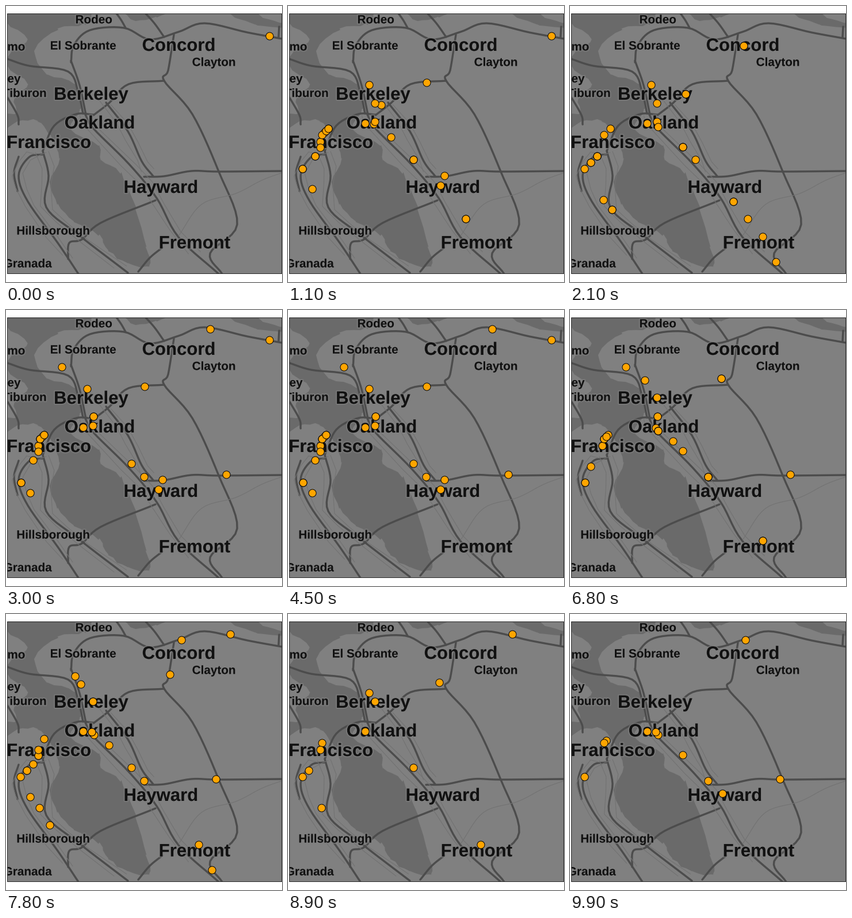
A matplotlib script for the animation above (10 s loop, 480 px wide and 480 px high).

```python
import numpy as np
import matplotlib.pyplot as plt
from matplotlib.animation import FuncAnimation
from matplotlib.patheffects import withStroke

FRAMES, STEP_MS = 100, 100
LAND, WATER, ROAD, LANE = "#808080", "#6a6a6a", "#4c4c4c", "#727272"
LEFT, RIGHT, TOP, BOTTOM = 2, 479, 13, 465
BIG, SMALL = 31.1, 20.7
rng = np.random.default_rng(5)

plt.rcParams["font.family"] = "Liberation Sans"
fig = plt.figure(figsize=(4.8, 4.8), dpi=100, facecolor="white")
ax = fig.add_axes([LEFT / 480, 1 - BOTTOM / 480,
                   (RIGHT - LEFT) / 480, (BOTTOM - TOP) / 480], facecolor=LAND)
ax.set(xlim=(LEFT, RIGHT), ylim=(BOTTOM, TOP), xticks=[], yticks=[])
for spine in ax.spines.values():
    spine.set(linewidth=0.7, color="#222222", zorder=5)


def points(path):
    return np.array([p.split(",") for p in path.split()], float)


def smooth(path, n=8):
    """Catmull-Rom curve through the key points."""
    p = points(path)
    p = np.vstack([2 * p[0] - p[1], p, 2 * p[-1] - p[-2]])
    t = np.linspace(0, 1, n)[:, None]
    return np.vstack([
        b + t * (c - a) / 2 + t**2 * (a - 2.5 * b + 2 * c - d / 2)
        + t**3 * (1.5 * (b - c) + (d - a) / 2)
        for a, b, c, d in zip(p, p[1:], p[2:], p[3:])])


def water(path):
    shore = smooth(path, 5)
    ax.fill(*(shore + rng.normal(0, 0.8, shore.shape)).T, color=WATER, lw=0, zorder=1)


def road(xy, width=3.4, color=ROAD):
    ax.plot(*xy.T, color=color, lw=width * 0.72, zorder=2,
            solid_joinstyle="round", solid_capstyle="round")


def label(text, x, y, size, align="center"):
    ax.text(x, y, text, size=size * 0.72, weight="bold", color="#111111",
            ha=align, va="baseline", zorder=3, clip_on=True,
            path_effects=[withStroke(linewidth=3, foreground="#80808099")])


# Bays
water("-5,5 0,28 38,58 12,77 2,104 38,136 14,160 18,187 -5,190 -5,218 20,201 "
      "55,200 76,225 93,265 76,305 90,345 118,375 162,398 178,425 212,447 "
      "250,452 243,418 224,350 200,291 165,268 162,243 112,214 130,178 "
      "120,135 72,119 50,77 90,40 137,32 152,5")
water("195,5 225,25 262,20 300,5")
water("365,5 400,20 436,33 485,38 485,30 446,20 436,5")

highways = {
    "delta": "113,98 118,68 146,42 205,38 250,58 300,45 345,30 420,46 480,57",
    "bridge": "240,10 258,30 275,54",
    "carquinez": "190,10 200,24 208,38",
    "shore": "113,95 128,138 139,189",
    "richmond": "2,92 40,104 108,114 126,152 134,187",
    "valley": "292,50 282,112 275,130 324,188 370,288 402,380 355,430 376,466",
    "hills": "275,130 213,136 180,168 152,190",
    "foothill": "174,168 212,218 236,270 256,296",
    "pass": "240,297 275,296 322,287 370,288 480,287",
    "nimitz": "138,189 152,213 214,275 262,334 300,402 370,466",
    "span": "260,338 165,377 132,406 110,412 108,440",
    "crossing": "64,252 84,208 122,188 152,189",
    "bayside": "64,252 74,295 70,350 126,398 212,464",
    "ridge": "64,258 40,263 22,295 38,340 90,412 126,466",
    "coast": "22,262 14,290 20,322",
    "marin": "2,158 20,190 22,206",
    "south": "230,462 250,438 272,420",
    "east": "475,36 474,54",
}
for path in highways.values():
    road(smooth(path))

# Side streets run roughly alongside the main routes
for name in ("nimitz", "foothill", "bayside", "ridge"):
    for shift in (-11, 9):
        line = smooth(highways[name])[::5] + (shift, 0)
        road(line + rng.normal(0, 2, line.shape), 1.1, LANE)
road(smooth("300,400 340,345 400,326 445,303 480,290"), 1.1, LANE)

for text, x, y in (("Concord", 300.5, 78), ("Berkeley", 148, 163),
                   ("Oakland", 163, 213), ("Hayward", 269.5, 325),
                   ("Fremont", 328, 421.5)):
    label(text, x, y, BIG)
for text, x, y in (("Rodeo", 152.5, 30.2), ("El Sobrante", 134, 75.6),
                   ("Clayton", 361.5, 104.3), ("Hillsborough", 82, 397.5)):
    label(text, x, y, SMALL)
label("San Francisco", 148.5, 247, BIG, "right")
for text, x, y in (("San Anselmo", 33, 77.4), ("Mill Valley", 26, 133),
                   ("Tiburon", 70.5, 158.2), ("El Granada", 79.5, 454.5)):
    label(text, x, y, SMALL, "right")


def backward(path):
    return " ".join(reversed(path.split()))


def stations(path):
    """Stops of a line; each * is spaced evenly between its neighbours."""
    stops = path.split()
    known = [i for i, s in enumerate(stops) if s != "*"]
    xy = points(" ".join(stops[i] for i in known))
    return np.column_stack([np.interp(range(len(stops)), known, c) for c in xy.T])


# Track sections, joined into lines
delta = "458,51.5 389.5,34.5 355,33 304.5,45 301.5,69 284.5,105 * 241,133 * 161.5,172 "
north = "97,98.5 120,107.5 * * 151,152 * "
centre = "151.5,185 150.5,201 148.5,205 "
tube = "134,204 69.5,213 * * 59,224 55.5,236 56,245.5 46.5,261 * 24.5,282.5 "
peninsula = "26,299.5 * 57.5,337 73,354 "
lake = "152.5,210 178.5,227.5 196,244.5 * 240,290 "
south = "265,311.5 284,339.5 * 334.5,400.5 358,444.5"
LINES = [stations(path) for path in (
    delta + centre + tube + peninsula,
    north + centre + lake + south,
    backward(lake + "272,295 365,287 383,286") + " " + tube,
    backward(lake + south) + " " + tube,
    north + centre + tube + peninsula + "76,367",
    "196,244.5 186,277",
)]
MINUTES, DWELL, EVENING = 11, 2, 85


def run_times(stops):
    gaps = np.hypot(*np.diff(stops, axis=0).T)
    return np.concatenate([[0], np.cumsum(1 + gaps / 12)])


def trains(step):
    """Stations where a train is standing, both directions of every line."""
    clock = step * MINUTES
    late = step >= EVENING
    headway = 20 if late else 15
    found = []
    for i, line in enumerate(LINES[:3] if late else LINES):
        for j, stops in enumerate((line, line[::-1])):
            since = clock - run_times(stops) - 7 * i - 4 * j
            found.append(stops[(since >= 0) & (since % headway < DWELL)])
    return np.vstack(found)


dots = ax.scatter([], [], s=9.4 ** 2, c="orange", edgecolors="black",
                  linewidths=0.7, zorder=4)


def update(step):
    dots.set_offsets(trains(step))
    return dots,


anim = FuncAnimation(fig, update, frames=FRAMES, interval=STEP_MS,
                     repeat=True, repeat_delay=0)
plt.show()
```
